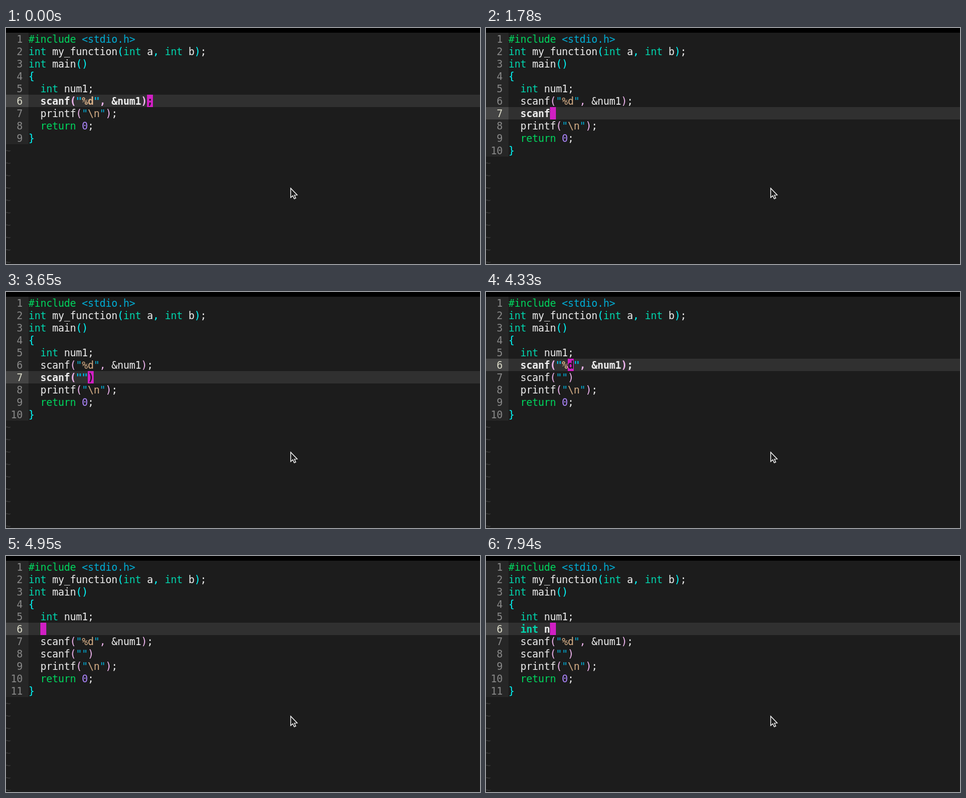
An HTML page with a canvas for the animation above (8000 ms loop, 800 by 400 pixels).

```html
<!DOCTYPE html>
<html>
<head>
<meta charset="utf-8">
<style>
html, body { margin: 0; width: 100%; height: 100%; overflow: hidden; background: #1c1c1c; }
canvas { display: block; }
</style>
</head>
<body>
<canvas id="stage" width="800" height="400"></canvas>
<script>
const ctx = document.getElementById('stage').getContext('2d');
const LOOP = 8000, TOP = 8, LEFT = 38, CW = 10, LH = 21;
const FONT = '17px "DejaVu Sans Mono", monospace';
const WHITE = '#eeeeee', GREEN = '#00d75f', BLUE = '#00afd7', TEAL = '#00d7af',
      TAN = '#d7af87', PURPLE = '#af87ff';
const LEVELS = ['#00ffff', '#f6baf6', '#5fd7ff'];

const HEAD = ['#include <stdio.h>', 'int my_function(int a, int b);', 'int main()', '{', '  int num1;'];
const SCAN = '  scanf("%d", &num1);';
const TAIL = ['  printf("\\n");', '  return 0;', '}'];

// [start ms, cursor row, cursor column, second scanf line, new declaration line]
const STEPS = [
  [0, 6, 20],
  [980, 7, 2, ''],
  [1390, 7, 3, 's'],
  [1470, 7, 4, 'sc'],
  [1700, 7, 5, 'sca'],
  [1740, 7, 6, 'scan'],
  [1780, 7, 7, 'scanf'],
  [2460, 7, 8, 'scanf('],
  [2510, 7, 9, 'scanf()'],
  [2740, 7, 8, 'scanf()'],
  [3450, 7, 9, 'scanf(")'],
  [3650, 7, 10, 'scanf("")'],
  [4330, 6, 10, 'scanf("")'],
  [4550, 5, 10, 'scanf("")'],
  [4810, 5, 11, 'scanf("")'],
  [4950, 6, 2, 'scanf("")', ''],
  [6510, 6, 3, 'scanf("")', 'i'],
  [6610, 6, 4, 'scanf("")', 'in'],
  [6820, 6, 5, 'scanf("")', 'int'],
  [7510, 6, 6, 'scanf("")', 'int '],
  [7940, 6, 7, 'scanf("")', 'int n']
];

const indent = s => s === undefined ? [] : ['  ' + s];

// Splits a line into [text, colour] pairs; open brackets carry over to later lines.
function highlight(line, open) {
  const level = () => LEVELS[(open.length - 1) % LEVELS.length];
  const tokens = line.match(/#include|<.*>|"[^"]*"?|\w+|\s+|./g) || [];
  return tokens.flatMap(tok => {
    if (tok[0] === '"') return [...tok].map(c => [c, c === '"' ? BLUE : TAN]);
    if (tok === '#include' || tok === 'return') return [[tok, GREEN]];
    if (tok === 'int') return [[tok, TEAL]];
    if (tok === '0') return [[tok, PURPLE]];
    if (tok[0] === '<') return [[tok, BLUE]];
    if ('({'.includes(tok)) {
      open.push(tok);
      return [[tok, level()]];
    }
    if (tok === ',') return [[tok, level()]];
    if (')}'.includes(tok) && open[open.length - 1] === (tok === ')' ? '(' : '{')) {
      const color = level();
      open.pop();
      return [[tok, color]];
    }
    return [[tok, WHITE]];
  });
}

function rect(x, y, w, h, color) {
  ctx.fillStyle = color;
  ctx.fillRect(x, y, w, h);
}

// Writes text on the character grid; column 0 is the first code column.
function write(text, col, row, color) {
  ctx.fillStyle = color;
  [...text].forEach((c, i) => ctx.fillText(c, LEFT + (col + i) * CW, TOP + row * LH - 4));
}

function drawPointer() {
  ctx.beginPath();
  [[480.5, 271.5], [480.5, 287.5], [484, 284.3], [486.5, 289.5], [489, 288.5],
   [486.8, 283.2], [491.5, 283]].forEach(p => ctx.lineTo(...p));
  ctx.closePath();
  ctx.fillStyle = '#1c1c1c';
  ctx.fill();
  ctx.strokeStyle = '#ffffff';
  ctx.lineWidth = 1.2;
  ctx.stroke();
}

function draw(t) {
  const [, curRow, curCol, second, decl] = STEPS.findLast(s => s[0] <= t);
  const lines = [...HEAD, ...indent(decl), SCAN, ...indent(second), ...TAIL];
  const open = [];

  rect(0, 0, 800, 400, '#1c1c1c');
  rect(0, 0, 800, TOP, '#000000');
  rect(0, TOP, LEFT, lines.length * LH, '#262626');

  lines.forEach((line, i) => {
    const row = i + 1, y = TOP + i * LH, current = row === curRow;
    if (current) {
      rect(0, y, LEFT, LH, '#444444');
      rect(LEFT, y, 800 - LEFT, LH, '#303030');
    }
    ctx.font = FONT;
    write(String(row).padStart(3), -4, row, current ? '#dadac8' : '#8a8a8a');

    if (current) ctx.font = 'bold ' + FONT;
    let col = 0;
    for (const [text, color] of highlight(line, open)) {
      write(text, col, row, color);
      col += text.length;
    }
    if (current) {
      rect(LEFT + curCol * CW, y, CW, LH, '#d01fc3');
      write(line[curCol] || ' ', curCol, row, '#1c1c1c');
    }
  });

  ctx.font = FONT;
  for (let row = lines.length + 1; row <= 19; row++) write('~', -4, row, '#3a3a3a');
  drawPointer();
}

function tick() {
  draw(performance.now() % LOOP);
  requestAnimationFrame(tick);
}
tick();
</script>
</body>
</html>
```
